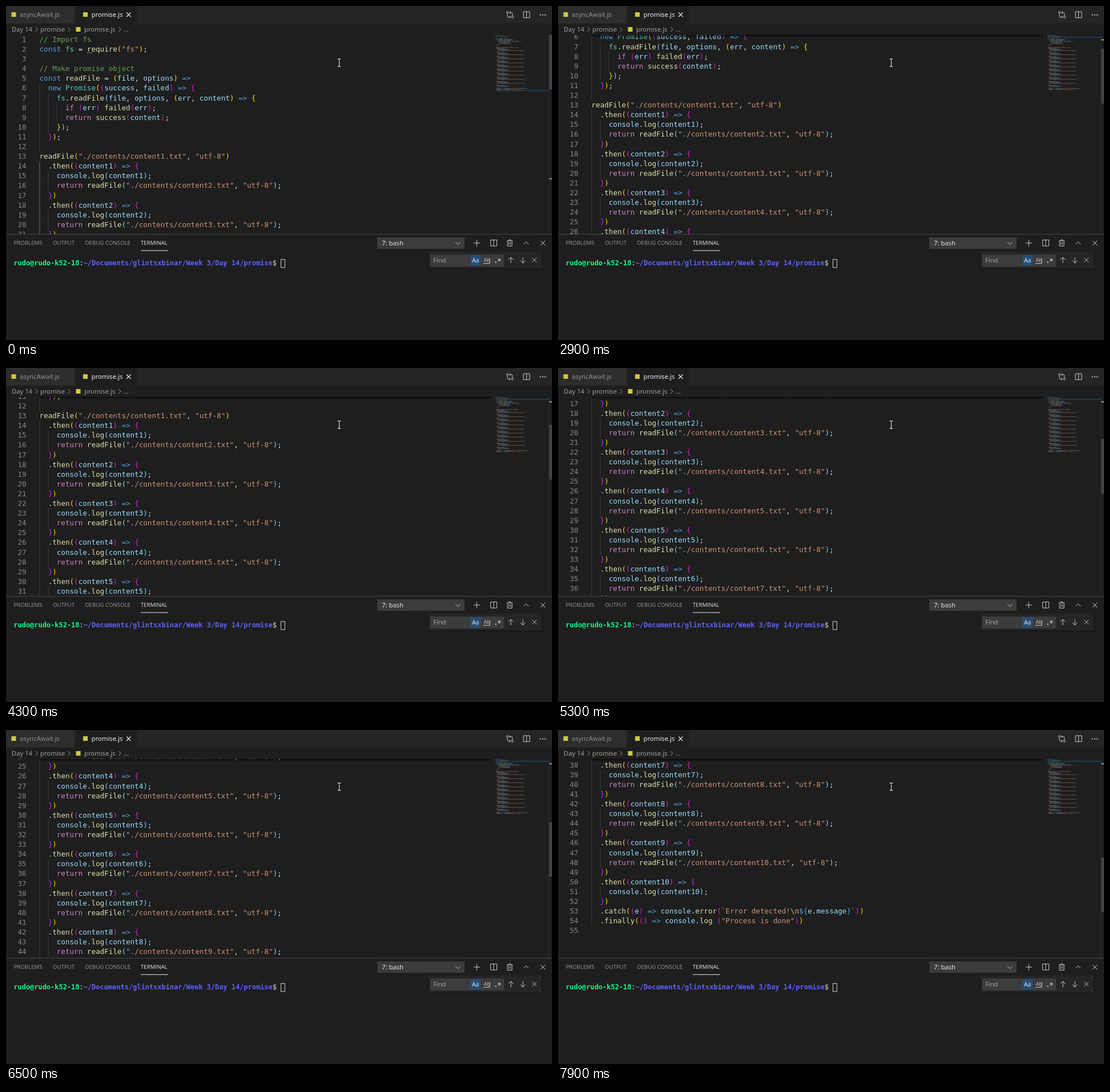
An HTML page for the animation above (8000 ms loop, 956 by 586 pixels).

```html
<!DOCTYPE html>
<html lang="en">
<head>
<meta charset="utf-8">
<title>Code editor scrolling</title>
<style>
html, body { margin: 0; width: 100%; height: 100%; overflow: hidden; background: #1e1e1e; }
svg { display: block; width: 956px; height: 586px; }
text { white-space: pre; font-family: "Open Sans", "Noto Sans", sans-serif; font-size: 11.3px; fill: #a9a9a9; }
.mono text { font-family: "DejaVu Sans Mono", monospace; font-size: 12.58px; fill: #d4d4d4; }
.mono .num { fill: #858585; text-anchor: end; }
.mono .active { fill: #c6c6c6; }
.mono .ghost { fill: #414141; }
.mono .term { font-size: 11.96px; fill: #e0e0e0; }
.caps text { font-size: 9.7px; fill: #9a9a9a; }
.icon { fill: none; stroke: #c8c8c8; stroke-width: 1; }
.crumb { fill: none; stroke: #9a9a9a; stroke-width: 1; }
</style>
</head>
<body>
<svg viewBox="0 0 956 586">
  <defs>
    <clipPath id="pane"><rect y="50.4" width="951" height="349.6"/></clipPath>
    <linearGradient id="fade" x2="0" y2="1">
      <stop stop-color="#000" stop-opacity=".65"/><stop offset="1" stop-color="#000" stop-opacity="0"/>
    </linearGradient>
    <path id="beam" d="M580.5 92.8h1.8l1.2 1 1.2-1h1.8M583.5 93.5v12M580.5 106.2h1.8l1.2-1 1.2 1h1.8"/>
  </defs>
  <rect width="956" height="586" fill="#1e1e1e"/>

  <!-- Editor -->
  <g clip-path="url(#pane)">
    <g id="scroller" class="mono">
      <g id="current">
        <rect x="59.2" y="85.4" width="791" height="15.6" fill="none" stroke="#292929" stroke-width="1.6"/>
        <text class="ghost" x="108.5" y="97.1">Find related code in plumexvantor</text>
      </g>
      <g id="guides"></g>
      <g id="code"></g>
      <path d="M142.5 82h1.4m2 0h1.4m2 0h1.4" stroke="#c0c0c0" stroke-width="1.4"/>
      <rect id="caret" x="58.3" y="84.8" width="1.8" height="17" fill="#aeafad"/>
    </g>
    <rect id="shadow" x="58" y="50.4" width="792" height="5" fill="url(#fade)"/>
  </g>
  <rect id="mapLine" x="857" width="94" height="1.6" fill="#24405c"/>
  <g id="map" opacity=".42"></g>
  <rect x="950.6" y="50.4" width=".9" height="349.6" fill="#353535"/>
  <rect id="slider" x="951" width="5" height="96" fill="#424242"/>
  <rect id="mark" x="951" width="5" height="1.8" fill="#a0a0a0"/>

  <!-- Tabs and breadcrumbs -->
  <rect width="956" height="30.6" fill="#252526"/>
  <rect width="120.6" height="30.6" fill="#2d2d2d"/>
  <rect x="121.4" width="107.6" height="31" fill="#1e1e1e"/>
  <g fill="#cbcb41">
    <rect x="9.5" y="11" width="8" height="8"/><rect x="135" y="11" width="8" height="8"/>
    <rect x="122.5" y="37" width="8" height="8"/>
  </g>
  <text x="24" y="19" style="fill:#969696">asyncAwait.js</text>
  <text x="149.8" y="19" style="fill:#fff">promise.js</text>
  <text x="10" y="45">Day 14</text>
  <text x="60" y="45">promise</text>
  <text x="137" y="45">promise.js</text>
  <text x="206" y="45">…</text>
  <path class="crumb" d="M51.5 37l4 4-4 4M108.5 37l4 4-4 4M197 37l4 4-4 4"/>
  <path class="icon" d="M211 11.5l7.5 7.5m0-7.5l-7.5 7.5" style="stroke:#e8e8e8;stroke-width:1.2"/>
  <g class="icon">
    <circle cx="878" cy="11.5" r="1.7"/><circle cx="886.5" cy="19.5" r="1.7"/>
    <path d="M878 13.4v4q0 2 2 2h3m-2-2l2 2-2 2M886.5 17.5v-4q0-2-2-2h-3m2-2l-2 2 2 2"/>
    <path d="M906 10h11v10.5h-11zM911.5 10v10.5"/>
    <path d="M934.5 15.5h2m2.3 0h2m2.3 0h2" stroke-width="1.8"/>
  </g>

  <!-- Panel -->
  <rect y="400" width="956" height="1" fill="#444"/>
  <g class="caps">
    <text x="13.5" y="419.4">PROBLEMS</text>
    <text x="82" y="419.4">OUTPUT</text>
    <text x="138.5" y="419.4">DEBUG CONSOLE</text>
    <text x="236" y="419.4" style="fill:#e7e7e7">TERMINAL</text>
  </g>
  <rect x="236" y="428.6" width="48" height="1" fill="#e7e7e7"/>
  <rect x="650" y="406" width="153" height="20" fill="#3c3c3c"/>
  <text x="658" y="420" style="fill:#f0f0f0">7: bash</text>
  <g class="icon">
    <path d="M787 414.5l4.3 4.3 4.3-4.3M818.5 416h11.5m-5.75-5.75v11.5"/>
    <path d="M848.5 410.5h11v10.5h-11zM854 410.5v10.5"/>
    <path d="M877 412h10m-6.8 0v-1.7h3.6v1.7M878 412v9.3h8v-9.3m-5.4 2v5.2m2.8-5.2v5.2"/>
    <path d="M906.5 418l4.3-4.3 4.3 4.3M936 412l8 8m0-8l-8 8"/>
  </g>
  <g class="mono">
    <text class="term" x="13.3" y="455.4"><tspan font-weight="bold" fill="#16f78c">rudo@rudo-k52-18</tspan>:<tspan font-weight="bold" fill="#5f5fff">~/Documents/glintsxbinar/Week 3/Day 14/promise</tspan>$ </text>
  </g>
  <rect x="481.4" y="444.7" width="6.8" height="14.2" fill="none" stroke="#d0d0d0"/>

  <!-- Find box -->
  <rect x="738.5" y="432" width="201" height="30" rx="2" fill="#191919"/>
  <rect x="740" y="431" width="198" height="29" fill="#252526"/>
  <rect x="743" y="436" width="129" height="21" fill="#3c3c3c"/>
  <rect x="813" y="437.5" width="18" height="18" fill="#264f78"/>
  <text x="748" y="450">Find</text>
  <text x="816" y="450" style="font-size:10.3px;fill:#e4e4e4">Aa</text>
  <text x="836.5" y="449" style="font-size:8.6px;fill:#c8c8c8">Ab</text>
  <g class="icon">
    <path d="M835.5 451.5h11.5v-9.5"/>
    <path d="M863.8 442.5v6m-2.6-4.5l5.2 3m0-3l-5.2 3"/>
    <path d="M856.5 449.6h2.2" stroke-width="2.2"/>
    <path d="M884 451v-10m-4.5 4.5l4.5-4.5 4.5 4.5M905 441v10m-4.5-4.5l4.5 4.5 4.5-4.5"/>
    <path d="M921.5 442l7.5 7.5m0-7.5l-7.5 7.5"/>
  </g>

  <!-- Mouse pointer -->
  <g fill="none">
    <use href="#beam" stroke="#000" stroke-width="2.6"/>
    <use href="#beam" stroke="#f4f4f4" stroke-width="1.2"/>
  </g>
</svg>
<script>
const $ = id => document.getElementById(id);
const TOP = 50.4, LEFT = 58.5, ROW = 17.1, CELL = 7.573, TICK = 45, LOOP = 8000;
const rowY = n => TOP + (n - 1) * ROW;

const lines = `// Import fs
const fs = require("fs");

// Make promise object
const readFile = (file, options) =>
  new Promise((success, failed) => {
    fs.readFile(file, options, (err, content) => {
      if (err) failed(err);
      return success(content);
    });
  });

readFile("./contents/content1.txt", "utf-8")`.split("\n");
for (let i = 1; i <= 10; i++) {
  lines.push(`  .then((content${i}) => {`, `    console.log(content${i});`);
  if (i < 10) lines.push(`    return readFile("./contents/content${i + 1}.txt", "utf-8");`);
  lines.push("  })");
}
lines.push("  .catch((e) => console.error(`Error detected!\\n${e.message}`))",
  '  .finally(() => console.log ("Process is done"))', "");

// Each rule: pattern and colour; the first that fits wins
const rules = [
  [/\/\/.*/, "#6a9955"],
  [/"[^"]*"|`Error detected!|`/, "#ce9178"],
  [/\\n/, "#d7ba7d"],
  [/\$\{|\}(?=`)|=>|\b(?:const|new)\b/, "#569cd6"],
  [/\b(?:return|if)\b/, "#c586c0"],
  [/\b(?:Promise|fs)\b/, "#4ec9b0"],
  [/[({]/, "open"],
  [/[)}]/, "close"],
  [/\w+(?= ?\(| = \()/, "#dcdcaa"],
  [/\w+/, "#9cdcfe"],
  [/\s+|./, "#d4d4d4"],
];
const lexer = new RegExp(rules.map(r => `(${r[0].source})`).join("|"), "g");
const rainbow = ["#ffd700", "#d61fd0", "#87cefa"];
let depth = 0;

function tokens(line) {
  return [...line.matchAll(lexer)].map(m => {
    let color = rules[m.slice(1).findIndex(g => g !== undefined)][1];
    if (color === "open") color = rainbow[depth++ % 3];
    if (color === "close") color = rainbow[--depth % 3];
    return { text: m[0], at: m.index, color };
  });
}

const escape = s => s.replace(/&/g, "&amp;").replace(/</g, "&lt;");
let code = "", map = "";
lines.forEach((line, i) => {
  const n = i + 1, y = rowY(n) + 12.5, list = tokens(line);
  code += `<text class="num" id="num${n}" x="35.6" y="${y}">${n}</text><text x="${LEFT}" y="${y}">` +
    list.map(t => `<tspan fill="${t.color}">${escape(t.text)}</tspan>`).join("") + "</text>";
  for (const t of list) {
    for (const word of t.text.matchAll(/\S+/g)) {
      map += `<rect x="${857 + (t.at + word.index) * 0.9}" y="${TOP + i * 1.8 + 0.3}" ` +
        `width="${word[0].length * 0.9}" height="1" fill="${t.color}"/>`;
    }
  }
});
$("code").innerHTML = code;
$("map").innerHTML = map;

const guide = (level, from, to, id = "") =>
  `<rect id="${id}" x="${LEFT + level * 2 * CELL}" y="${rowY(from)}" width=".9" height="${(to - from + 1) * ROW}" fill="#404040"/>`;
let guides = guide(0, 6, 12) + guide(1, 7, 10) + guide(2, 8, 9) + guide(0, 14, 54, "chain");
for (let n = 15; n <= 51; n += 4) guides += guide(1, n, n < 51 ? n + 1 : n);
$("guides").innerHTML = guides;

// Wheel position in ticks, from the given time on
const wheel = [[0, 0], [2600, 1], [2700, 3], [2900, 2], [3000, 1], [3100, 0], [3500, 1], [4000, 2],
  [4300, 4], [5000, 5], [5300, 6], [6100, 7], [6200, 8], [6500, 9], [6700, 10], [7100, 11],
  [7400, 12], [7700, 13], [7900, 14]];

const show = (id, on) => $(id).setAttribute("visibility", on ? "visible" : "hidden");

function draw(t) {
  const scroll = wheel.filter(w => w[0] <= t).pop()[1] * TICK;
  const clicked = t >= 700;
  $("scroller").setAttribute("transform", `translate(0 ${-scroll})`);
  $("slider").setAttribute("y", TOP + scroll * 0.2746);
  $("mapLine").setAttribute("y", TOP + (clicked ? 2 : 54) * 1.8);
  $("mark").setAttribute("y", clicked ? 58.4 : 302.3);
  $("chain").setAttribute("fill", clicked ? "#404040" : "#707070");
  $("num3").classList.toggle("active", clicked);
  show("current", clicked);
  show("caret", clicked && (t - 600) % 1000 < 500);
  show("shadow", scroll > 0);
}

const start = performance.now();
function tick() {
  draw((performance.now() - start) % LOOP);
  requestAnimationFrame(tick);
}
tick();
</script>
</body>
</html>
```
